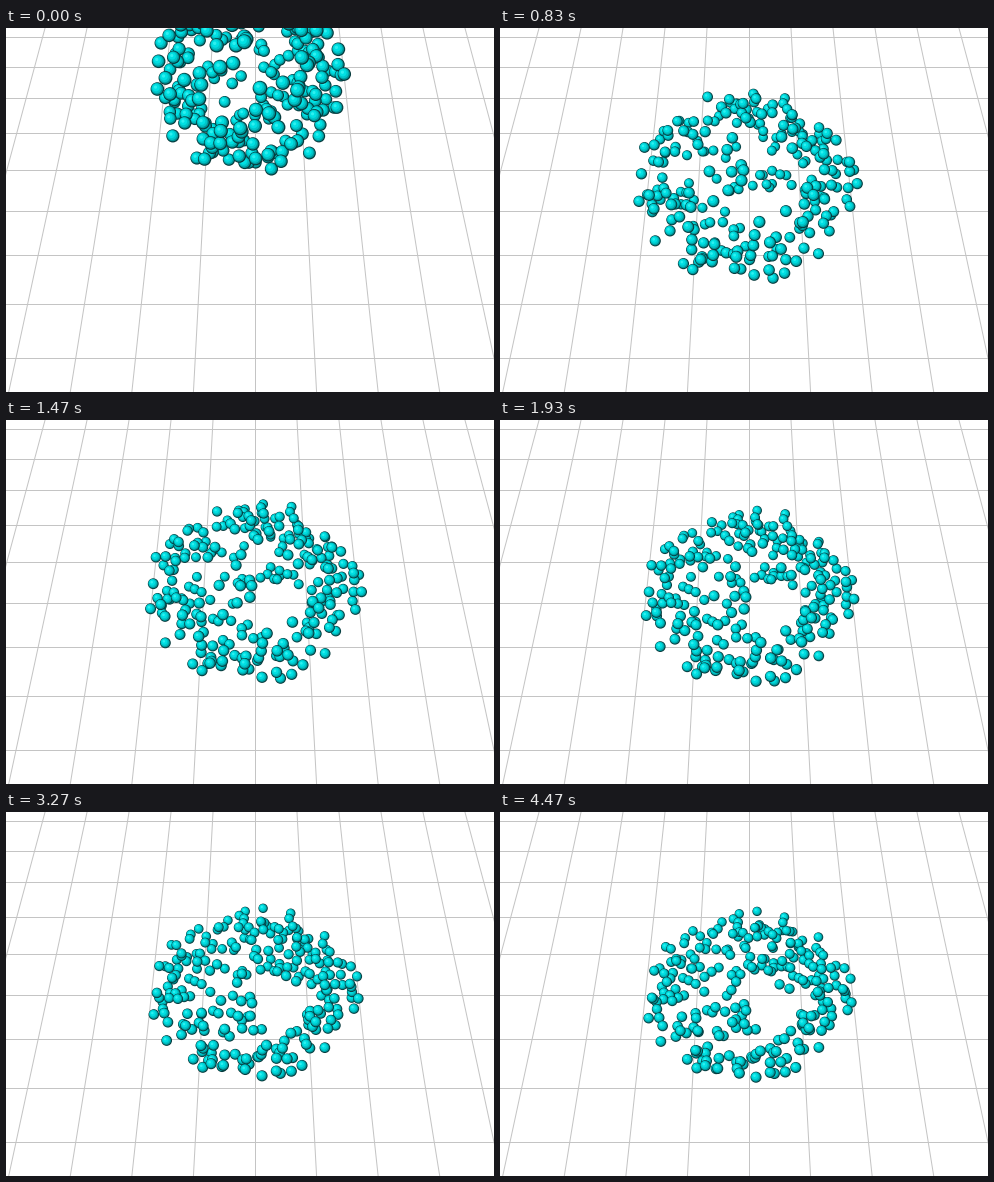
These frames come from a looping animation (488 px wide and 364 px high, 4.51 s). A matplotlib script:

```python
import numpy as np
import matplotlib.pyplot as plt
from matplotlib.animation import FuncAnimation

W, H, DPI = 488, 364, 100
LOOP, FRAMES = 4510, 135
COUNT = 245
LANDING = 0.6  # seconds until the ball hits the ground

# Camera: focal length in pixels, tilt, horizon and centre of the view
FOCAL, SIN, COS = 667, 0.822, 0.5695
CX, CY, HORIZON = 249, 182, -780.45

# Shading of one ball: relative radius, shift to the upper left, colour
LAYERS = [(1.0, 0.0, "#053a3c"), (0.86, 0.04, "#009599"),
          (0.74, 0.12, "#00c4c8"), (0.54, 0.2, "#00e0e3"),
          (0.24, 0.28, "#2ef0f0")]


def body(t):
    """Centre height, half height and ground radius of the soft ball."""
    if t < LANDING:
        fall = (t / LANDING) ** 2
        return 181 - 134 * fall, 71 - 21 * fall, 71 + 29 * fall
    s = t - LANDING
    bounce = 30 * np.exp(-2 * s) * np.sin(np.pi * s)
    height = 7 + 40 * np.exp(-s / 1.7) + bounce
    half = 6 + 44 * np.exp(-(s / 2.4) ** 2) + bounce
    return height, half, 100


def project(units, t):
    """Screen positions and depths of points of the deformed ball."""
    height, half, radius = body(t)
    x = -4 * max(0, 1 - t / 1.5) + radius * units[:, 0]
    y = -3 + radius * units[:, 1]
    z = np.maximum(3, height + half * units[:, 2])
    depth = FOCAL + COS * y - SIN * z
    scale = FOCAL / depth
    pos = np.column_stack([CX + x * scale, CY - (SIN * y + COS * z) * scale])
    return pos, depth


def make_balls(rng):
    """Points in a thick shell, with a hollow that stays open on screen."""
    units = rng.normal(size=(2 * COUNT, 3))
    units /= np.linalg.norm(units, axis=1)[:, None]
    units *= rng.uniform(0.7, 1.04, (len(units), 1))
    pos, _ = project(units, LOOP / 1000)
    hollow = np.hypot(pos[:, 0] - 268, pos[:, 1] - 192) < 22
    return units[~hollow][:COUNT]


balls = make_balls(np.random.default_rng(12))

fig = plt.figure(figsize=(W / DPI, H / DPI), dpi=DPI, facecolor="white")
ax = fig.add_axes([0, 0, 1, 1])
ax.set_xlim(0, W)
ax.set_ylim(H, 0)
ax.axis("off")

grid = dict(color="#c4c4c4", lw=0.72, zorder=1)
for n in range(9):
    y = HORIZON + 1 / (9.009e-4 + n * 0.4571e-4)
    ax.plot([0, W], [y, y], **grid)
ends = np.array([0, H])
for k in range(-6, 7):
    ax.plot(CX + k * 0.0538 * (ends - HORIZON), ends, **grid)

rel, shift, shades = zip(*LAYERS)
rel, shift = np.array(rel), np.array(shift)
blank = np.zeros(COUNT * len(LAYERS))
dots = ax.scatter(blank, blank, c=list(shades) * COUNT, linewidths=0, zorder=2)


def draw(frame):
    pos, depth = project(balls, frame * LOOP / FRAMES / 1000)
    order = np.argsort(-depth)
    pos, r = pos[order], 3340 / depth[order]
    spots = pos[:, None, :] - (r[:, None] * shift)[:, :, None]
    dots.set_offsets(spots.reshape(-1, 2))
    dots.set_sizes(((2 * r[:, None] * rel * 72 / DPI) ** 2).ravel())
    return [dots]


anim = FuncAnimation(fig, draw, frames=FRAMES, interval=LOOP / FRAMES,
                     repeat=True, repeat_delay=0, blit=False)
plt.show()
```
